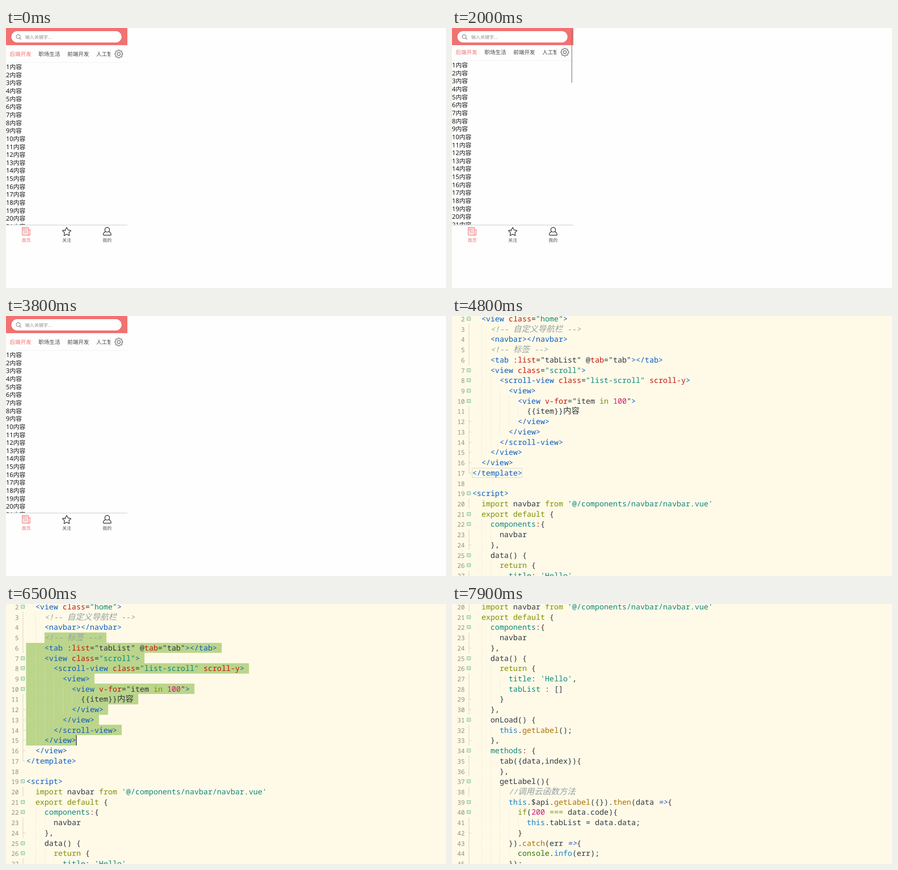
These frames come from a looping animation (975 px wide and 575 px high, 8000 ms). An HTML page:

```html
<!DOCTYPE html>
<html lang="zh-CN">
<head>
<meta charset="utf-8">
<title>List scrolling and its code</title>
<style>
html, body { margin: 0; height: 100%; overflow: hidden; background: #fefefe; }
svg { display: block; text-rendering: geometricPrecision; }
#phone text { font-family: 'Noto Sans CJK SC', 'Noto Sans CJK', sans-serif; }
#phone .num { font: 14px 'Noto Sans', sans-serif; }
#code text { font: 16.78px 'Noto Sans Mono', 'Noto Sans CJK SC', 'Noto Sans CJK', monospace; fill: #2f383f; }
#code .no { font-size: 13.9px; fill: #998e7c; }
#code .cjk { font-size: 18.3px; }
#code .b { fill: #0d5cc4; }
#code .r { fill: #c4170a; }
#code .s { fill: #12877c; }
#code .o { fill: #7f9100; }
#code .m { fill: #d01a78; }
#code .c { fill: #93a1a1; font-style: italic; }
#code .f { fill: #aa7300; }
#code .t { fill: #1580cd; }
#code .a { fill: #2347d0; font-style: italic; }
#code .g { fill: #357500; }
</style>
</head>
<body>
<svg width="975" height="575" viewBox="0 0 975 575">
  <g id="phone">
    <rect width="975" height="575" fill="#fefefe"/>
    <g id="page">
      <g id="rows" font-size="13.6" fill="#151515"></g>
      <g id="tabs" font-size="12" fill="#444"></g>
      <path d="M231.5 48V67" stroke="#ddd"/>
      <path d="M0 76H269" stroke="#eee"/>
      <g fill="none" stroke="#555" stroke-width="1.3">
        <path id="gear"/>
        <circle cx="250" cy="57.5" r="3.3"/>
      </g>
    </g>
    <rect width="269" height="38" fill="#f07272"/>
    <rect x="12" y="7" width="244" height="25" rx="12.5" fill="#fff"/>
    <g fill="none" stroke="#777" stroke-width="1.2">
      <circle cx="27" cy="19" r="4.3"/>
      <path d="M30.2 22.2L33.3 25.2"/>
    </g>
    <text x="42.5" y="23.7" font-size="10.1" fill="#909090">输入关键字...</text>
    <rect y="435" width="269" height="140" fill="#fefefe"/>
    <path d="M0 435.7H269" stroke="#d6d6d6" stroke-width="1.4"/>
    <g fill="none" stroke="#f07272" stroke-width="1.3" stroke-linejoin="round">
      <path d="M36 441.5H49.5V458H38Q36 458 36 456ZM49.5 446.5H53.3V456Q53.3 458 51.5 458H48"/>
      <path d="M38.5 444.5H42.5V447.8H38.5ZM44 444.5H47M44 447.5H47M38.5 450.5H47M38.5 453.5H47" stroke-width="1.1"/>
    </g>
    <g fill="none" stroke="#2a2a30" stroke-width="1.4" stroke-linejoin="round">
      <path id="star"/>
      <path d="M130.2 450Q130.8 447.8 132.6 447.3" stroke-width="1"/>
      <circle cx="224.2" cy="446.2" r="5.2"/>
      <path d="M220.8 450.2Q216 452.5 215.5 456.5Q215.5 458.2 217 458.2H231.5Q233 458.2 232.8 456.5Q232.3 452.5 227.6 450.2"/>
    </g>
    <g font-size="10.1" text-anchor="middle" fill="#555">
      <text x="44.8" y="472.7" fill="#f07272">首页</text>
      <text x="134.5" y="472.7">关注</text>
      <text x="224" y="472.7">我的</text>
    </g>
    <rect id="bar" x="264" width="2.8" height="117" rx="1" fill="#808080" fill-opacity=".55"/>
  </g>
  <g id="code">
    <rect width="975" height="575" fill="#fffae8"/>
    <g id="editor">
      <path id="selection" fill="#bbd58b"/>
      <g id="lines"></g>
      <rect id="match" x="44.5" y="336.5" width="110.5" height="21" fill="none" stroke="#d6d6c6"/>
      <rect id="caret" width="1.4" height="22.7" fill="#222"/>
    </g>
  </g>
</svg>
<script>
// "§x" switches to colour class x
const source = String.raw`
  §b<view §rclass§k=§s"home"§b>
    §c<!-- 自定义导航栏 -->
    §b<navbar></navbar>
    §c<!-- 标签 -->
    §b<tab §k:§rlist§k="tabList" @§rtab§k="tab"§b></tab>
    §b<view §rclass§k=§s"scroll"§b>
      §b<scroll-view §rclass§k=§s"list-scroll" §rscroll-y§b>
        §b<view>
          §b<view §rv-for§k="item §oin §m100§k"§b>
            §k{{item}}内容
          §b</view>
        §b</view>
      §b</scroll-view>
    §b</view>
  §b</view>
§b</template>

§b<script>
  §oimport §knavbar §ofrom §s'@/components/navbar/navbar.vue'
  §oexport default §k{
    §scomponents§r:§k{
      §knavbar
    §k},
    §kdata() {
      §oreturn §k{
        §stitle§r: §s'Hello'§k,
        §stabList §r: §k[]
      §k}
    §k},
    §konLoad() {
      §tthis§k.§fgetLabel§k();
    §k},
    §smethods§r: §k{
      §ktab({data,index}){
      §k},
      §kgetLabel(){
        §c//调用云函数方法
        §tthis§k.$api.§fgetLabel§k({}).§fthen§k(data §a=>§k{
          §oif§k(§m200 §o=== §kdata.code){
            §tthis§k.tabList = data.data;
          §k}
        §k}).§fcatch§k(err §a=>§k{
          §gconsole§k.§tinfo§k(err);
        §k});`.slice(1).split('\n');

const FIRST = 2, PITCH = 22.72, CHAR = 10.07, WIDE = 18.3, LEFT = 45;
const folds = new Set([2, 7, 8, 9, 10, 19, 21, 22, 25, 26, 31, 34, 37, 39, 40]);
const foldEnds = new Set([12, 13, 14, 15, 16, 17, 24, 29, 30, 33, 42]);

const $ = id => document.getElementById(id);
const range = n => Array.from({ length: n }, (_, i) => i);
const escapeText = s => s.replace(/&/g, '&amp;').replace(/</g, '&lt;');
const rowMiddle = n => 6 + (n - FIRST) * PITCH;
const rowTop = n => Math.round(rowMiddle(n) - PITCH / 2);
const indentOf = n => source[n - FIRST].search(/\S|$/);

function lineEnd(n) {
  const plain = source[n - FIRST].replace(/§./g, '');
  return [...plain].reduce((x, ch) => x + (ch > '\u2fff' ? WIDE : CHAR), LEFT);
}

function gutter(n) {
  const y = Math.round(rowMiddle(n)), top = rowTop(n), bottom = rowTop(n + 1);
  if (folds.has(n))
    return `<path d="M33.5 ${y - 3.5}h7.5v7h-7.5zM35.2 ${y}h4.2" fill="none" stroke="#55b088"/>`;
  if (n === 18) return '';
  const tick = foldEnds.has(n) ? `M37.5 ${y + .5}h5.5` : '';
  return `<path d="M37.5 ${top}V${n === 17 ? y + .5 : bottom}${tick}" fill="none" stroke="#d3d0bd"/>`;
}

function codeLine(line, i) {
  const n = FIRST + i, indent = indentOf(n), y = rowMiddle(n) + 6;
  const spans = line.trim().split('§').slice(1).map(part => {
    const text = escapeText(part.slice(1)).replace(/[\u3000-\u9fff]+/g, '<tspan class="cjk">$&</tspan>');
    return `<tspan class="${part[0]}">${text}</tspan>`;
  }).join('');
  let guides = '';
  for (let col = 2; col < indent; col += 2)
    guides += `M${Math.round(LEFT + col * CHAR) + .5} ${rowTop(n)}V${rowTop(n + 1)}`;
  return `<path d="${guides}" stroke="#e3dfcf" stroke-dasharray="1 1"/>${gutter(n)}
    <text class="no" x="28.3" y="${y}" text-anchor="end">${n}</text>
    <text x="${LEFT + indent * CHAR}" y="${y}">${spans}</text>`;
}

function polar(cx, cy, count, radius) {
  return 'M' + range(count).map(i => {
    const a = i / count * 2 * Math.PI, r = radius(i, a);
    return `${(cx + r * Math.sin(a)).toFixed(2)} ${(cy - r * Math.cos(a)).toFixed(2)}`;
  }).join('L') + 'Z';
}

$('lines').innerHTML = source.map(codeLine).join('');
$('rows').innerHTML = range(34).map(i =>
  `<text y="${91 + i * 17.65}"><tspan class="num">${i + 1}</tspan>内容</text>`).join('');
$('tabs').innerHTML = ['后端开发', '职场生活', '前端开发', '人工智能'].map((name, i) =>
  `<text x="${8 + i * 64}" y="62"${i ? '' : ' fill="#f07272"'}>${name}</text>`).join('') +
  '<rect x="232" y="40" width="37" height="35" fill="#fefefe"/>';
$('gear').setAttribute('d', polar(250, 57.5, 96, (i, a) => 8 + .9 * Math.cos(8 * a)));
$('star').setAttribute('d', polar(134.5, 451, 10, i => i % 2 ? 5.2 : 10));

const scrollKeys = [[0, 0], [700, 0], [800, 43], [900, 76], [1000, 84], [1200, 84], [1300, 42],
  [1400, 8], [1500, 0], [1900, 0], [2000, 4], [2500, 168], [2700, 168], [3300, 0], [8000, 0]];

function scrollAt(t) {
  const i = scrollKeys.findIndex(key => key[0] > t);
  const [t0, a] = scrollKeys[i - 1], [t1, b] = scrollKeys[i];
  return a + (b - a) * (t - t0) / (t1 - t0);
}

function barOpacity(t) {
  if (t < 800) return 0;
  const fadeStart = t < 2000 ? 1800 : 3600;
  return Math.max(0, Math.min(1, 1 - (t - fadeStart + 100) / 300));
}

function drawPhone(t) {
  const offset = scrollAt(t);
  $('page').setAttribute('transform', `translate(0 ${-offset})`);
  $('bar').setAttribute('y', 3 + offset * .245);
  $('bar').setAttribute('opacity', barOpacity(t));
}

function drawEditor(t) {
  const selecting = t >= 5600 && t < 7600;
  const last = [5, 6, 8, 10, 12, 14, 15][Math.min(6, Math.max(0, (t - 5600) / 100))];
  const start = LEFT + 4 * CHAR;
  const caretX = last === 5 ? start : lineEnd(last);
  let area = '';
  if (selecting && last > 5)
    for (let n = 5; n <= last; n++) {
      const x = n === 5 ? start : 44.5;
      area += `M${x} ${rowTop(n)}H${n === last ? caretX : lineEnd(n) + CHAR}V${rowTop(n + 1)}H${x}Z`;
    }
  $('selection').setAttribute('d', area);
  $('match').style.display = t < 5600 ? '' : 'none';
  $('caret').style.display = selecting && Math.floor(t / 500) % 2 ? '' : 'none';
  $('caret').setAttribute('x', caretX - .6);
  $('caret').setAttribute('y', rowTop(last));
  const scrolled = t < 7800 ? 0 : t < 7900 ? 9 : 18;
  $('editor').setAttribute('transform', `translate(0 ${-scrolled * PITCH})`);
}

function draw(now) {
  const t = Math.floor(now % 8000 / 100) * 100;
  const showPhone = t < 4800;
  $('phone').style.display = showPhone ? '' : 'none';
  $('code').style.display = showPhone ? 'none' : '';
  (showPhone ? drawPhone : drawEditor)(t);
}

const began = performance.now();
function loop() {
  draw(performance.now() - began);
  requestAnimationFrame(loop);
}
loop();
</script>
</body>
</html>
```
